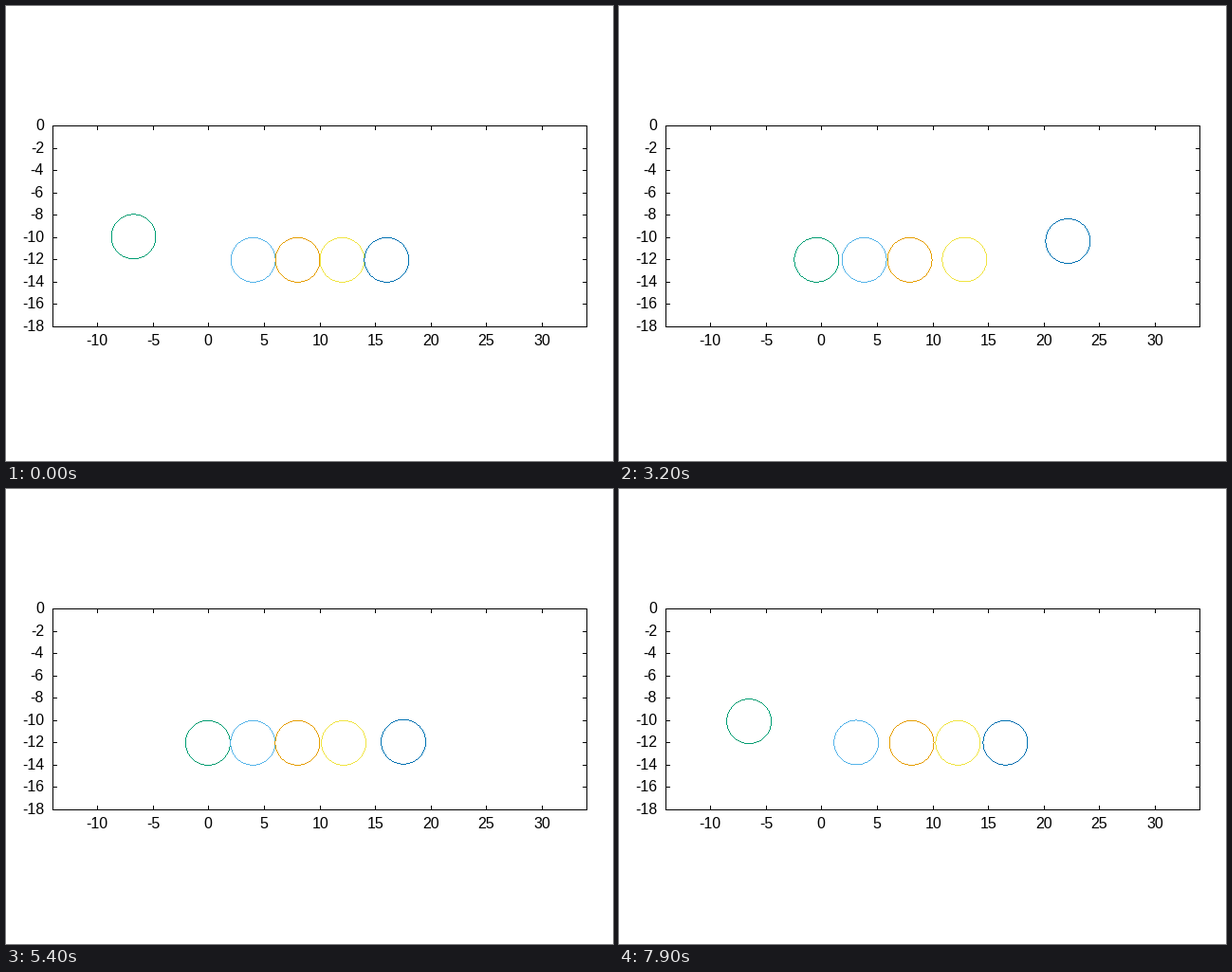
Write a matplotlib script that moves like this. It is 640 by 480 pixels and loops after 8000 ms.

```python
import numpy as np
import matplotlib.pyplot as plt
from matplotlib.animation import FuncAnimation
from matplotlib.collections import PolyCollection

W, H, DPI = 640, 480, 100
PX = 72 / DPI  # one pixel in points
plt.rcParams["font.family"] = "Liberation Sans"

FRAMES, STEP = 80, 100
LENGTH, RADIUS, W0 = 12, 2, 0.835
PIVOTS = np.arange(5) * 4
COLORS = ["#009e73", "#56b4e9", "#e69f00", "#f0e442", "#0072b2"]

# Each phase: its end, the time it passes the lowest point, arc amplitudes
PHASES = [
    (1.815, 1.825, (7.2, 0, 0, 0, 0)),
    (5.66, 1.815, (-0.5, -0.19, -0.09, 0.92, 7.12)),
    (np.inf, 5.66, (-7.14, -0.93, 0.09, 0.26, 0.54)),
]

# Plot box, through the centres of its border pixels
LEFT, RIGHT, TOP, BOTTOM = 49.5, 612.5, 126.5, 338.5
TICK = 4
RING = RADIUS * (RIGHT - LEFT) / 48
SQUARE = np.array([(0, 0), (1, 0), (1, 1), (0, 1)])


def px(x):
    return LEFT + (x + 14) * (RIGHT - LEFT) / 48


def py(y):
    return TOP - y * (BOTTOM - TOP) / 18


def angles(t):
    """Angle of every pendulum at time t in seconds."""
    zero, arcs = next((z, a) for end, z, a in PHASES if t < end)
    amp = np.array(arcs) / LENGTH
    return amp * np.sin(W0 * (1 - amp**2 / 16) * (t - zero))


def arcs_along(c, d):
    """Pixels of the two flat arcs of a ring, stepped along the first axis."""
    reach = int(RING / np.sqrt(2)) + 1
    k = np.floor(c) + np.arange(-reach, reach + 1)
    rise = np.sqrt(RING**2 - (k + 0.5 - c) ** 2)
    return np.tile(k, 2), np.floor(np.concatenate([d - rise, d + rise]))


def ring(cx, cy):
    """Crisp one-pixel circle outline as unit squares."""
    x1, y1 = arcs_along(cx, cy)
    y2, x2 = arcs_along(cy, cx)
    cells = np.column_stack([np.append(x1, x2), np.append(y1, y2)])
    return np.unique(cells, axis=0)[:, None] + SQUARE


fig = plt.figure(figsize=(W / DPI, H / DPI), dpi=DPI, facecolor="white")
ax = fig.add_axes([0, 0, 1, 1])
ax.set_xlim(0, W)
ax.set_ylim(H, 0)
ax.axis("off")


def line(x, y):
    ax.plot(x, y, color="black", lw=PX, snap=False,
            solid_capstyle="projecting", solid_joinstyle="miter")


def label(x, y, value, ha):
    ax.text(x, y, f"{value:d}", size=16 * PX, ha=ha, va="baseline")


def draw_box():
    line([LEFT, RIGHT, RIGHT, LEFT, LEFT], [TOP, TOP, BOTTOM, BOTTOM, TOP])
    for v in range(-10, 31, 5):
        x = np.floor(px(v)) + 0.5
        line([x, x], [BOTTOM, BOTTOM - TICK])
        line([x, x], [TOP, TOP + TICK])
        label(x - 0.25, 358, v, "center")
    for v in range(0, -19, -2):
        y = np.floor(py(v)) + 0.5
        line([LEFT, LEFT + TICK], [y, y])
        line([RIGHT, RIGHT - TICK], [y, y])
        label(40, y + 4.5, v, "right")


draw_box()
balls = []
for color in COLORS:
    ball = PolyCollection([], facecolors=color, edgecolors="none",
                          linewidths=0, snap=False)
    balls.append(ax.add_collection(ball, autolim=False))


def update(i):
    for ball, x0, th in zip(balls, PIVOTS, angles(i * STEP / 1000)):
        x, y = x0 + LENGTH * np.sin(th), -LENGTH * np.cos(th)
        ball.set_verts(ring(px(x), py(y)))
    return balls


anim = FuncAnimation(fig, update, frames=FRAMES, interval=STEP,
                     repeat=True, repeat_delay=0, blit=False)
plt.show()
```
